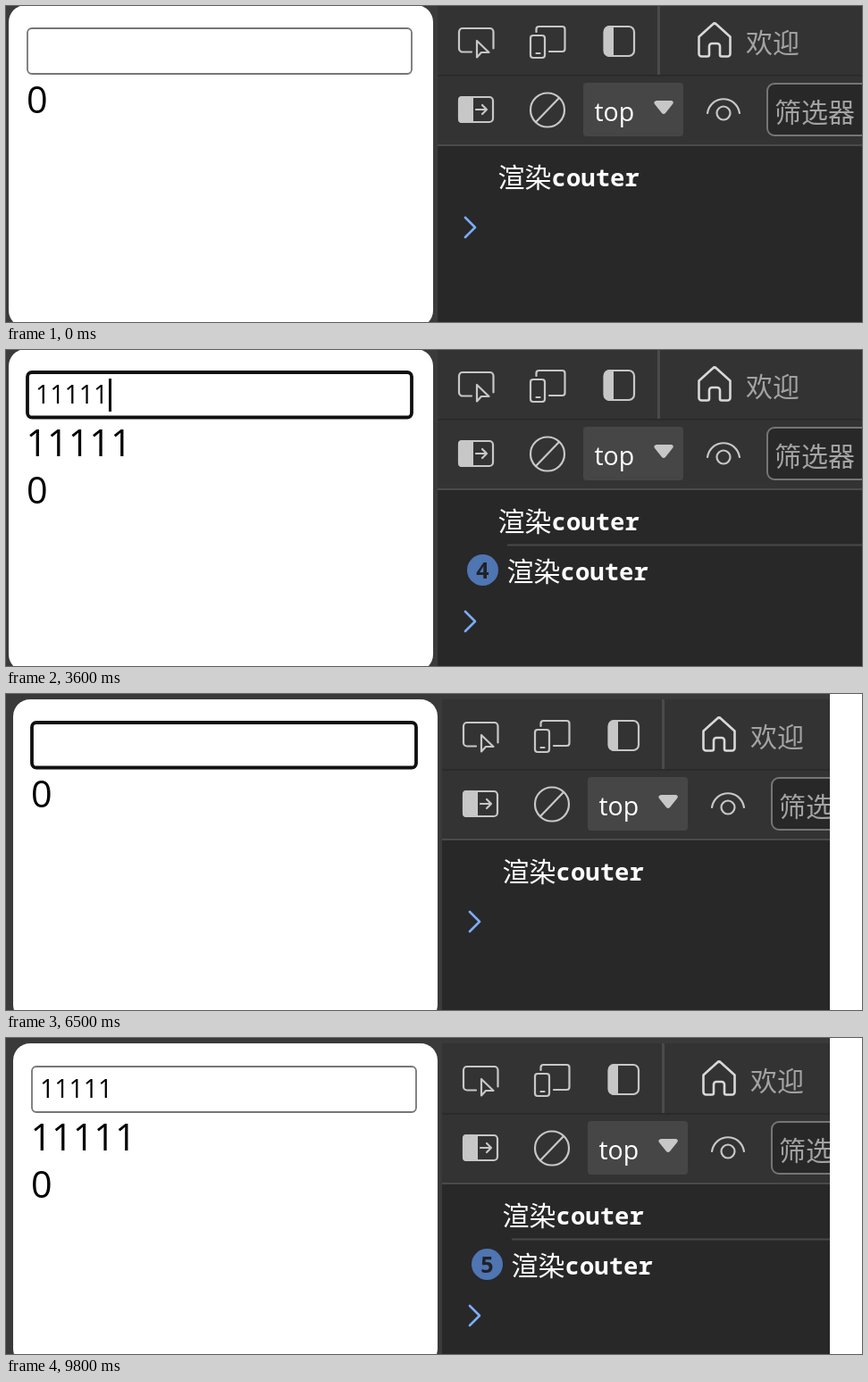
Write an HTML page that moves like this. It is 958 by 354 pixels and loops after 9900 ms.

```html
<!DOCTYPE html>
<html lang="zh-CN">
<head>
<meta charset="utf-8">
<title>Counter render log</title>
<style>
  html, body { margin: 0; width: 100%; height: 100%; overflow: hidden; background: #fff; }
  svg { display: block; width: 958px; height: 354px; }
  text { white-space: pre; }
  .sans { font-family: "Open Sans", "Noto Sans", sans-serif; }
  .cjk { font: 30px "Noto Sans CJK SC", "Noto Sans CJK", sans-serif; }
  .muted { fill: #a3a3a3; }
  .output { font-size: 41.3px; }
  .log { fill: #fff; }
  .log .word { font: 600 27.3px "Noto Sans Mono", monospace; }
  .icon { fill: none; stroke: #c7c7c7; stroke-width: 2.2; stroke-linejoin: round; stroke-linecap: round; }
  .icon .solid { fill: #c7c7c7; stroke: none; }
</style>
</head>
<body>
<svg viewBox="0 0 958 354">
  <defs>
    <g id="message" class="log">
      <text class="cjk" x="-0.5" y="203" font-weight="300">渲染</text>
      <text class="word" x="59.5" y="201.5">couter</text>
    </g>
  </defs>
  <rect width="958" height="354" fill="#3a3a3a"/>
  <g id="scene">
    <!-- page -->
    <rect x="3" y="-1" width="475" height="361" rx="19" fill="#fff"/>
    <rect id="field" x="24" y="25" width="430" rx="5" fill="#fff"/>
    <text id="typed" class="sans" x="33" y="60" font-size="28.4" font-weight="500"></text>
    <rect id="caret" y="32" width="3" height="37"/>
    <text id="echo" class="sans output" x="22.5" y="119"></text>
    <text id="count" class="sans output" x="23">0</text>

    <!-- developer tools -->
    <rect x="483" y="-1" width="480" height="157" fill="#333"/>
    <rect x="483" y="77" width="480" height="1.5" fill="#292929"/>
    <rect x="483" y="157" width="480" height="210" fill="#282828"/>
    <rect x="483" y="155" width="480" height="2" fill="#4a4a4a"/>
    <rect x="729" y="-1" width="3" height="78" fill="#4a4a4a"/>
    <g fill="#464646">
      <rect x="646" y="86" width="112" height="60" rx="4"/>
      <rect id="eyeHover" x="768" y="86" width="70" height="60" rx="4"/>
    </g>
    <rect x="852" y="87" width="140" height="58" rx="8" fill="#282828" stroke="#757575" stroke-width="2"/>

    <g class="icon">
      <path d="M521 51.500H511a4 4 0 0 1-4-4V29a4 4 0 0 1 4-4h30.500a4 4 0 0 1 4 4v18.500"/>
      <path d="M527 39v18.500l5-5.500h8.500z"/>
      <rect x="587" y="33" width="16" height="25" rx="3"/>
      <path d="M593.500 29v-3a3 3 0 0 1 3-3h26a3 3 0 0 1 3 3v22a3 3 0 0 1-3 3H608M593.500 53h4"/>
      <rect x="669.500" y="23" width="33.500" height="33" rx="6"/>
      <path class="solid" d="M680 22v35h-4a7 7 0 0 1-7-7V29a7 7 0 0 1 7-7z"/>
      <path d="M775.500 34.500L791 20.500q2-2 4 0l15.500 14v19a3 3 0 0 1-3 3H801a2 2 0 0 1-2-2V45a3 3 0 0 0-3-3h-6a3 3 0 0 0-3 3v9.500a2 2 0 0 1-2 2h-6.500a3 3 0 0 1-3-3z" stroke-width="2.600" stroke="#d8d8d8"/>
      <rect x="507" y="102" width="38" height="28" rx="4"/>
      <path class="solid" d="M510 101h13v30h-13a4 4 0 0 1-4-4v-22a4 4 0 0 1 4-4z"/>
      <path d="M526 116h12M533 111l5 5-5 5"/>
      <circle cx="606" cy="116.500" r="19"/>
      <path d="M593 130l26-27"/>
      <path class="solid" d="M728 106h17q3 1 1 4l-8 10q-2 2-4 0l-8-10q-2-3 2-4z"/>
      <g id="eye">
        <path d="M785 120c4-21 32-21 36 0"/>
        <circle cx="803" cy="120" r="7.500"/>
      </g>
    </g>
    <text class="cjk muted" x="828" y="52">欢迎</text>
    <text class="cjk muted" x="860" y="130">筛选器</text>
    <text class="sans" x="658.5" y="128.5" font-size="28.5" fill="#fff">top</text>

    <!-- console -->
    <use href="#message" x="551"/>
    <g id="repeat">
      <rect id="rule" y="217.5" width="420" height="2" fill="#484848"/>
      <use id="again" href="#message" y="56"/>
      <g id="badge">
        <circle cx="533.5" cy="246.500" r="17.500" fill="#4f75b2"/>
        <text id="tally" class="sans" x="533.5" y="255.5" font-size="25" font-weight="700"
              text-anchor="middle" fill="#202226"></text>
      </g>
    </g>
    <path id="prompt" d="M514 237l11 11-11 11" fill="none" stroke="#7cacf8"
          stroke-width="2.6" stroke-linecap="round" stroke-linejoin="round"/>
  </g>
  <rect id="margin" height="354" fill="#fff"/>
</svg>
<script>
const LOOP = 9900;
const passes = [
  { start: 0, shift: [0, 0], right: 958, hover: 300, focus: 700, blink: 1200,
    keys: [1500, 1900, 2500, 3100, 3600, 4200],
    logs: [1500, 2000, 2600, 3100, 3700, 4200],
    eye: [4500, 4700], caretEnd: 4600, blur: 5000 },
  { start: 5500, shift: [5, 7], right: 922, hover: 5900, focus: 6000, blink: 6500,
    keys: [7000, 7400, 7900, 8400, 8900],
    logs: [7000, 7400, 7900, 8400, 8900],
    eye: [9200, 9500], caretEnd: 9400, blur: 9800 }
];

const el = id => document.getElementById(id);
const set = (id, attrs) => Object.entries(attrs).forEach(([k, v]) => el(id).setAttribute(k, v));
const show = (id, on) => set(id, { display: on ? "inline" : "none" });
const within = (t, from, to) => t >= from && t < to;
const passed = (t, times) => times.filter(time => t >= time).length;

function drawField(focused, hovered) {
  set("field", {
    height: focused ? 50.5 : 51,
    stroke: focused ? "#101010" : hovered ? "#4f4f4f" : "#767676",
    "stroke-width": focused ? 3.8 : 1.8
  });
}

function render(t) {
  const p = t < passes[1].start ? passes[0] : passes[1];
  const typed = passed(t, p.keys);
  const logged = passed(t, p.logs);

  set("scene", { transform: `translate(${p.shift})` });
  set("margin", { x: p.right, width: 958 - p.right });

  drawField(within(t, p.focus, p.blur), within(t, p.hover, p.focus));
  el("typed").textContent = el("echo").textContent = "1".repeat(typed);
  set("caret", { x: Math.round(33 + 16.3 * typed) });
  show("caret", within(t, p.focus, p.blink) || within(t, p.keys[0], p.caretEnd));
  set("count", { y: typed ? 171.5 : 119.5 });

  const indent = logged > 1 ? 561 : 551;
  set("rule", { x: indent });
  set("again", { x: indent });
  el("tally").textContent = logged;
  show("repeat", logged > 0);
  show("badge", logged > 1);
  set("prompt", { transform: `translate(0 ${logged ? 56 : 0})` });

  const eyeHovered = within(t, ...p.eye);
  show("eyeHover", eyeHovered);
  set("eye", { stroke: eyeHovered ? "#e6e6e6" : "#c7c7c7" });
}

function tick() {
  render(performance.now() % LOOP);
  requestAnimationFrame(tick);
}
tick();
</script>
</body>
</html>
```
